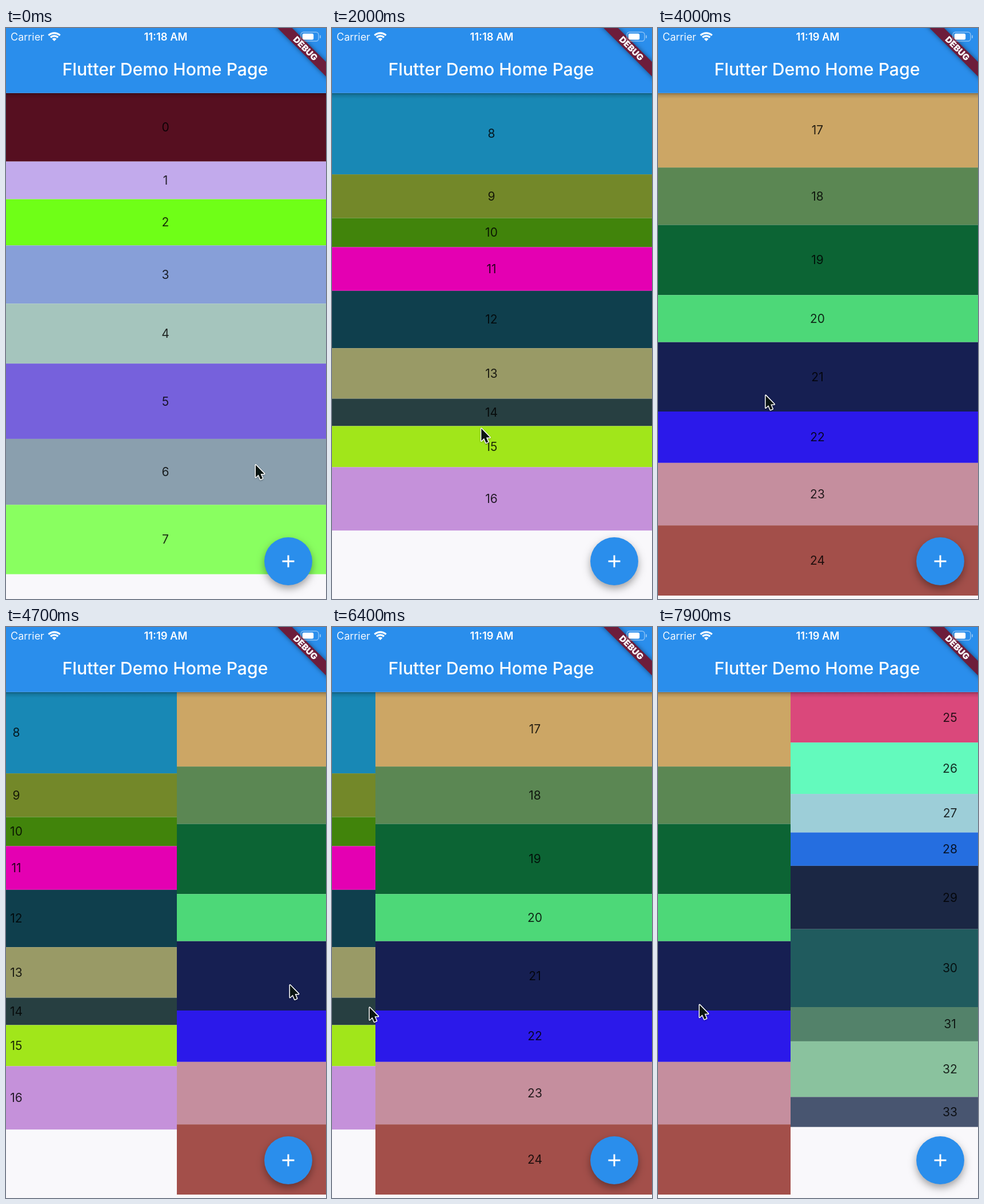
An HTML page with a canvas for the animation above (8000 ms loop, 560 px wide and 999 px high).

```html
<!DOCTYPE html>
<html lang="en">
<head>
<meta charset="utf-8">
<title>Paged list demo</title>
<style>
html, body { margin: 0; width: 100%; height: 100%; overflow: hidden; background: #f9f8fb; }
canvas { display: block; width: 560px; height: 999px; }
</style>
</head>
<body>
<canvas id="stage" width="560" height="999"></canvas>
<script>
const W = 560, H = 999, LOOP = 8000, STEP = 100;
const UNIT = H / 667;            // one layout point of the phone screen
const TOP = 76 * UNIT;
const BLUE = '#2a8eec', PAPER = '#f9f8fb';
const ctx = document.getElementById('stage').getContext('2d');

// Rows of each page: height in points and colour
const pages = [
  '80#560f20 44#c2aaec 54#6fff17 68#879fd8 70#a5c5bd 88#7661dc 77#8a9fae 81#89ff60',
  '95#1888b5 51#738829 34#41840b 51#e400b2 67#0f3f4d 59#999a66 32#273f41 48#a1e61a 74#c591da',
  '87#cca665 67#5b8753 82#0c6434 55#4dd878 81#161f52 60#2b19ea 73#c58e9e 82#a34f4a',
  '59#da487b 60#63fabd 45#9dced8 39#256ee0 74#1b2744 91#205b5e 40#53826a 65#8ac29e 35#485570'
].map(page => page.split(' ').map(row => row.split('#')));

// Pointer strokes that drag the pages; each one turns a page in its direction
const swipes = [
  { begin: 600, end: 1100, from: [436, 763], to: [39, 690] },
  { begin: 2650, end: 3100, from: [396, 705], to: [25, 665] },
  { begin: 4150, end: 4700, from: [197, 640], to: [496, 625] },
  { begin: 5700, end: 6340, from: [526, 622], to: [62, 664] },
  { begin: 7450, end: 8050, from: [400, 690], to: [11, 654] }
];

function smooth(u) {
  u = Math.min(1, Math.max(0, u));
  return u * u * (3 - 2 * u);
}

function glide(a, b, t, t0, t1) {
  const u = smooth((t - t0) / (t1 - t0));
  return a.map((v, i) => v + (b[i] - v) * u);
}

function pointerAt(t) {
  let last = null;
  for (const s of swipes) {
    if (t < s.begin) return last ? glide(last.to, s.from, t, last.end, s.begin) : s.from;
    if (t <= s.end) return glide(s.from, s.to, t, s.begin, s.end);
    last = s;
  }
  return last.to;
}

function scrollAt(t) {
  let rest = 0;
  for (const { begin, end, from, to } of swipes) {
    if (t < begin) break;
    if (t <= end) return rest + from[0] - pointerAt(t)[0];
    // critically damped spring to the next page
    const pull = from[0] - to[0];
    const target = rest + Math.sign(pull) * W;
    const wt = 14 * (t - end) / 1000;
    rest = target + (rest + pull - target) * (1 + wt) * Math.exp(-wt);
    if (wt > 9) rest = target;
  }
  return rest;
}

function label(text, x, y, size, weight, color, align = 'center') {
  ctx.font = `${weight} ${size}px Inter, Roboto, sans-serif`;
  ctx.textAlign = align;
  ctx.fillStyle = color;
  ctx.fillText(text, x, y);
}

function shadow(color, blur, dy) {
  ctx.shadowColor = color;
  ctx.shadowBlur = blur;
  ctx.shadowOffsetY = dy;
}

function fillRound(x, y, w, h, r, color) {
  ctx.beginPath();
  ctx.roundRect(x, y, w, h, r);
  ctx.fillStyle = color;
  ctx.fill();
}

function drawPages(scroll) {
  let number = 0;
  pages.forEach((rows, p) => {
    const x = Math.round(p * W - scroll);
    let y = TOP;
    for (const [points, color] of rows) {
      const h = points * UNIT;
      ctx.fillStyle = '#' + color;
      ctx.fillRect(x, y, W, h);
      label(number++, x + 279, y + h / 2 + 7.5, 21, 400, 'rgba(0,0,0,0.82)');
      y += h;
    }
  });
}

function drawHeader() {
  const g = ctx.createLinearGradient(0, TOP, 0, TOP + 10);
  g.addColorStop(0, 'rgba(0,0,0,0.32)');
  g.addColorStop(0.4, 'rgba(0,0,0,0.12)');
  g.addColorStop(1, 'rgba(0,0,0,0)');
  ctx.fillStyle = g;
  ctx.fillRect(0, TOP, W, 10);
  ctx.fillStyle = BLUE;
  ctx.fillRect(0, 0, W, TOP);
  label('Flutter Demo Home Page', 278.5, 82.5, 30.2, 500, '#fff');
}

function drawBanner() {
  ctx.save();
  ctx.translate(W, 0);
  ctx.rotate(Math.PI / 4);
  shadow('rgba(0,0,0,0.5)', 9, 0);
  ctx.fillStyle = '#6d1d3b';
  ctx.fillRect(-70, 28 * UNIT, 140, 12 * UNIT);
  shadow('transparent', 0, 0);
  label('DEBUG', 0, 56.2, 15.2, 900, '#fff');
  ctx.restore();
}

function drawWifi(x, y) {
  const wedge = r => {
    ctx.beginPath();
    ctx.arc(x, y, r, -Math.PI * 0.75, -Math.PI * 0.25);
  };
  ctx.strokeStyle = ctx.fillStyle = '#fff';
  ctx.lineWidth = 3.2;
  for (const r of [9.2, 14.2]) {
    wedge(r);
    ctx.stroke();
  }
  wedge(5.6);
  ctx.lineTo(x, y);
  ctx.fill();
}

function drawBattery(x, y) {
  const faint = 'rgba(255,255,255,0.45)';
  ctx.strokeStyle = faint;
  ctx.lineWidth = 1.4;
  ctx.beginPath();
  ctx.roundRect(x, y, 31, 15.8, 4.5);
  ctx.stroke();
  fillRound(x + 2.7, y + 2.6, 19.5, 10.6, 2.5, '#fff');
  fillRound(x + 33, y + 5.3, 2, 5.5, 1, faint);
}

function drawStatus(t) {
  label('Carrier', 8, 22, 18, 400, 'rgba(255,255,255,0.94)', 'left');
  drawWifi(84.5, 23);
  label(t < 4000 ? '11:18 AM' : '11:19 AM', 279.5, 22, 18.4, 600, '#fff');
  drawBattery(516, 7.2);
}

function drawButton(x, y) {
  ctx.save();
  shadow('rgba(0,0,0,0.36)', 14, 6);
  ctx.fillStyle = BLUE;
  ctx.beginPath();
  ctx.arc(x, y, 28 * UNIT, 0, Math.PI * 2);
  ctx.fill();
  ctx.restore();
  ctx.fillStyle = '#fff';
  ctx.fillRect(x - 10.5, y - 1.5, 21, 3);
  ctx.fillRect(x - 1.5, y - 10.5, 3, 21);
}

const arrow = new Path2D('M0 0V21.5L4.8 17L8.3 25L12 23.4L8.6 15.6L15 15.4Z');

function drawPointer([x, y]) {
  ctx.save();
  ctx.translate(x + 1, y + 1.5);
  ctx.lineJoin = 'round';
  ctx.lineWidth = 3;
  ctx.strokeStyle = '#fff';
  shadow('rgba(0,0,0,0.3)', 3, 1);
  ctx.stroke(arrow);
  shadow('transparent', 0, 0);
  ctx.fillStyle = '#0a1512';
  ctx.fill(arrow);
  ctx.restore();
}

function draw(now) {
  const t = Math.floor((now % LOOP) / STEP) * STEP;
  ctx.fillStyle = PAPER;
  ctx.fillRect(0, 0, W, H);
  drawPages(scrollAt(t));
  drawHeader();
  drawBanner();
  drawStatus(t);
  drawButton(494, 933);
  drawPointer(pointerAt(t));
}

const start = performance.now();
function tick() {
  draw(performance.now() - start);
  requestAnimationFrame(tick);
}
tick();
</script>
</body>
</html>
```
